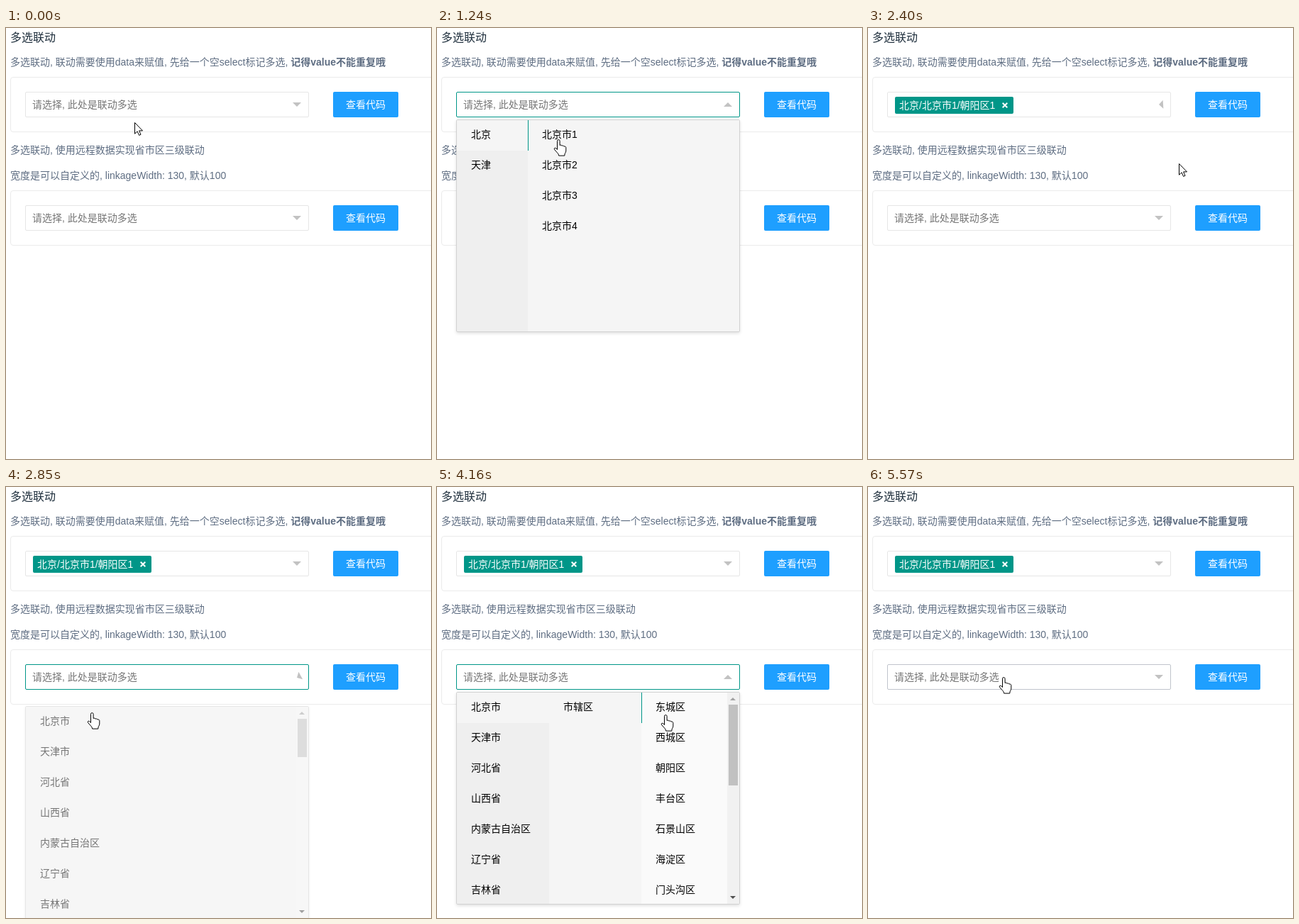
Animation of 599 by 608 pixels, one loop 6.11 s. Source, as an HTML page:

```html
<!DOCTYPE html>
<html lang="zh-CN">
<head>
<meta charset="utf-8">
<style>
html, body { margin: 0; width: 100%; height: 100%; overflow: hidden; background: #fff; }
body { position: relative; font: 14px/20px "Liberation Sans", "Noto Sans CJK SC", "Noto Sans CJK", sans-serif; white-space: nowrap; }
div, p, h1, svg, i { position: absolute; box-sizing: border-box; margin: 0; }
h1 { left: 6px; top: 4px; font-size: 16px; font-weight: 400; line-height: 20px; color: #1f2f3d; }
p { left: 6px; color: #5e6d82; }
.box { left: 6px; width: 620px; height: 78px; border: 1px solid #ebebeb; border-radius: 4px; }
.button { left: 461px; width: 92px; height: 36px; border-radius: 2px; background: #1e9fff; color: #fff; line-height: 36px; text-align: center; }
.field { left: 27px; width: 400px; height: 36px; border: 1px solid #e6e6e6; border-radius: 2px; background: #fff; }
.hint { left: 9px; top: 7px; color: #757575; }
.tag { left: 10px; top: 6px; height: 24px; padding: 0 26px 0 6px; border-radius: 2px; background: #009688; color: #fff; line-height: 24px; }
.tag svg { right: 8px; top: 8px; }
.edge { left: 376px; top: 14px; border: 6px solid transparent; border-top-color: #c2c2c2; }
.panel { left: 27px; width: 400px; height: 300px; border: 1px solid #d2d2d2; border-radius: 2px; background: #efefef; box-shadow: 0 2px 4px rgba(0,0,0,.12); overflow: hidden; z-index: 1; }
.col { top: 0; right: 0; bottom: 0; overflow: hidden; }
.row { left: 0; width: 100%; height: 43px; padding: 10px 20px; }
.row.active { background: #f5f5f5; }
.row.hover { box-shadow: inset 1px 0 #009688; }
.row.picked { color: #009688; }
.row.picked::before { content: ""; position: absolute; left: 0; top: 10px; width: 5px; height: 20px; background: #009688; }
.bar { right: 0; top: 0; width: 17px; height: 100%; background: #f1f1f1; }
.thumb { left: 2px; top: 17px; width: 13px; background: #c1c1c1; }
.up, .down { left: 4px; border: 4px solid transparent; }
.up { top: 3px; border-bottom-color: #a3a3a3; }
.down { bottom: 3px; border-top-color: #505050; }
.cursor { left: 0; top: 0; width: 20px; height: 26px; overflow: visible; z-index: 2; fill: #fff; stroke: #000; stroke-linejoin: round; }
</style>
</head>
<body>
<h1>多选联动</h1>
<p style="top:38px">多选联动, 联动需要使用data来赋值, 先给一个空select标记多选, <b>记得value不能重复哦</b></p>
<p style="top:162px">多选联动, 使用远程数据实现省市区三级联动</p>
<p style="top:198px">宽度是可以自定义的, linkageWidth: 130, 默认100</p>
<svg class="cursor">
  <path id="arrow" d="M.5.5V16.2L4.1 12.8 6.6 18.4 9 17.3 6.6 11.9H11.5Z"/>
  <path id="hand" transform="translate(-.5)" d="M5 14.5V2.4a1.8 1.8 0 0 1 3.6 0v6q1.6-1 3 .7q1.6-.8 2.8.8q2.2-.5 2.9 1.6v4.5q0 2-1.2 3.5q-.8 1.2-.8 3.6H7.2q-.3-2.2-1.5-3.4L1.3 14.8q-1.3-2 .4-2.7q1.3-.4 3.3 2.4Z"/>
</svg>
<script>
const LOOP = 6110;
const SHADES = ['#efefef', '#f5f5f5', '#fafafa'];

// open: when each column appears
const selects = [
  { y: 90, width: 100, open: [470, 1160, 1460], pick: 1840, close: 2310, clear: LOOP,
    label: '北京/北京市1/朝阳区1',
    cols: ['北京 天津', '北京市1 北京市2 北京市3 北京市4', '朝阳区1 朝阳区2 朝阳区3 朝阳区4'], thumbs: [] },
  { y: 250, width: 130, open: [2785, 3230, 3760], pick: 4330, close: 4780, clear: 5570,
    label: '北京市/市辖区/东城区',
    cols: ['北京市 天津市 河北省 山西省 内蒙古自治区 辽宁省 吉林省', '市辖区',
      '东城区 西城区 朝阳区 丰台区 石景山区 海淀区 门头沟区'], thumbs: [54, 0, 114] }
];

// Pointer moves: start, end, goal
const home = [181, 133];
const moves = [
  [0, 310, 174, 112], [460, 630, 162, 157], [1160, 1400, 190, 157], [1460, 1840, 316, 157],
  [1840, 2160, 509, 170], [2310, 2770, 150, 275], [2770, 2850, 121, 318],
  [3230, 3530, 175, 312], [3530, 3620, 198, 312], [3760, 4160, 322, 321],
  [4330, 4640, 485, 357], [4780, 5320, 191, 268]
];

const $ = id => document.getElementById(id);
const cursor = document.querySelector('.cursor');
const show = (el, on) => el.style.display = on ? '' : 'none';
const clamp = v => Math.min(1, Math.max(0, v));

function add(parent, cls, css, html = '') {
  const el = document.createElement('div');
  el.className = cls;
  el.style.cssText = css;
  el.innerHTML = html;
  return parent.appendChild(el);
}

function build(s) {
  add(document.body, 'box', `top:${s.y - 21}px`);
  add(document.body, 'button', `top:${s.y}px`, '查看代码');
  s.field = add(document.body, 'field', `top:${s.y}px`);
  s.hint = add(s.field, 'hint', '', '请选择, 此处是联动多选');
  s.tag = add(s.field, 'tag', '', s.label +
    '<svg width="8" height="8" stroke="#fff" stroke-width="2"><path d="M.7.7 7.3 7.3M7.3.7.7 7.3"/></svg>');
  s.edge = add(s.field, 'edge', '');
  s.panel = add(document.body, 'panel', `top:${s.y + 39}px`);
  s.groups = s.cols.map((names, i) => {
    const el = add(s.panel, 'col', `left:${i * s.width}px;background:${SHADES[i]}`);
    const rows = names.split(' ').map((name, k) => add(el, 'row', `top:${k * 43}px`, name));
    if (s.thumbs[i]) add(el, 'bar', '',
      `<i class="up"></i><div class="thumb" style="height:${s.thumbs[i]}px"></div><i class="down"></i>`);
    return { el, rows };
  });
}

// CSS "ease" curve, solved by bisection
function ease(x) {
  const bez = (u, a, b) => 3 * u * (1 - u) * ((1 - u) * a + u * b) + u ** 3;
  let lo = 0, hi = 1;
  for (let i = 0; i < 20; i++) {
    const mid = (lo + hi) / 2;
    if (bez(mid, .25, .25) < clamp(x)) lo = mid; else hi = mid;
  }
  return bez(hi, .1, 1);
}

function pointer(t) {
  let [x, y] = home;
  for (const [a, b, gx, gy] of moves) {
    const p = clamp((t - a) / (b - a));
    x += (gx - x) * p;
    y += (gy - y) * p;
  }
  return [Math.round(x), Math.round(y)];
}

// Updates one select; returns whether the pointer is on something clickable
function update(s, t, x, y) {
  const opened = t >= s.open[0] && t < s.close;
  const picked = t >= s.pick && t < s.clear;
  const inField = x >= 27 && x < 427 && y >= s.y && y < s.y + 36;
  const p = ease((t - s.open[0]) / 300);
  const turn = t < s.close ? p : 1 - ease((t - s.close) / 300);

  s.field.style.borderColor = opened ? '#009688' : inField ? '#c0c4cc' : '#e6e6e6';
  s.edge.style.transform = `translateY(${-6 * turn}px) rotate(${180 * turn}deg)`;
  show(s.hint, !picked);
  show(s.tag, picked);
  show(s.panel, opened);
  if (!opened) return inField;

  s.panel.style.opacity = .3 + .7 * p;
  s.panel.style.transform = `translateY(${Math.round(30 * (1 - p))}px)`;

  const count = s.open.filter(at => at <= t).length;
  const inPanel = x >= 28 && x < (s.thumbs[count - 1] ? 409 : 426);
  const col = Math.min(count - 1, Math.floor((x - 28) / s.width));
  const target = inPanel && s.groups[col].rows[Math.floor((y - s.y - 40) / 43)];
  s.groups.forEach(({ el, rows }, i) => {
    show(el, i < count);
    rows.forEach((row, k) => {
      row.classList.toggle('hover', row === target && t > s.open[0] + 80);
      row.classList.toggle('picked', picked && k === 0);
      row.classList.toggle('active', !picked && k === 0 && i === 0 && count > 1);
    });
  });
  return inField || !!target;
}

function draw(now) {
  const t = Math.max(0, now - start) % LOOP;
  const [x, y] = pointer(t);
  const hand = selects.map(s => update(s, t, x, y)).some(Boolean);
  show($('hand'), hand);
  show($('arrow'), !hand);
  cursor.style.transform = `translate(${hand ? x - 6 : x}px, ${y}px)`;
  requestAnimationFrame(draw);
}

selects.forEach(build);
const start = performance.now();
draw(start);
</script>
</body>
</html>
```
